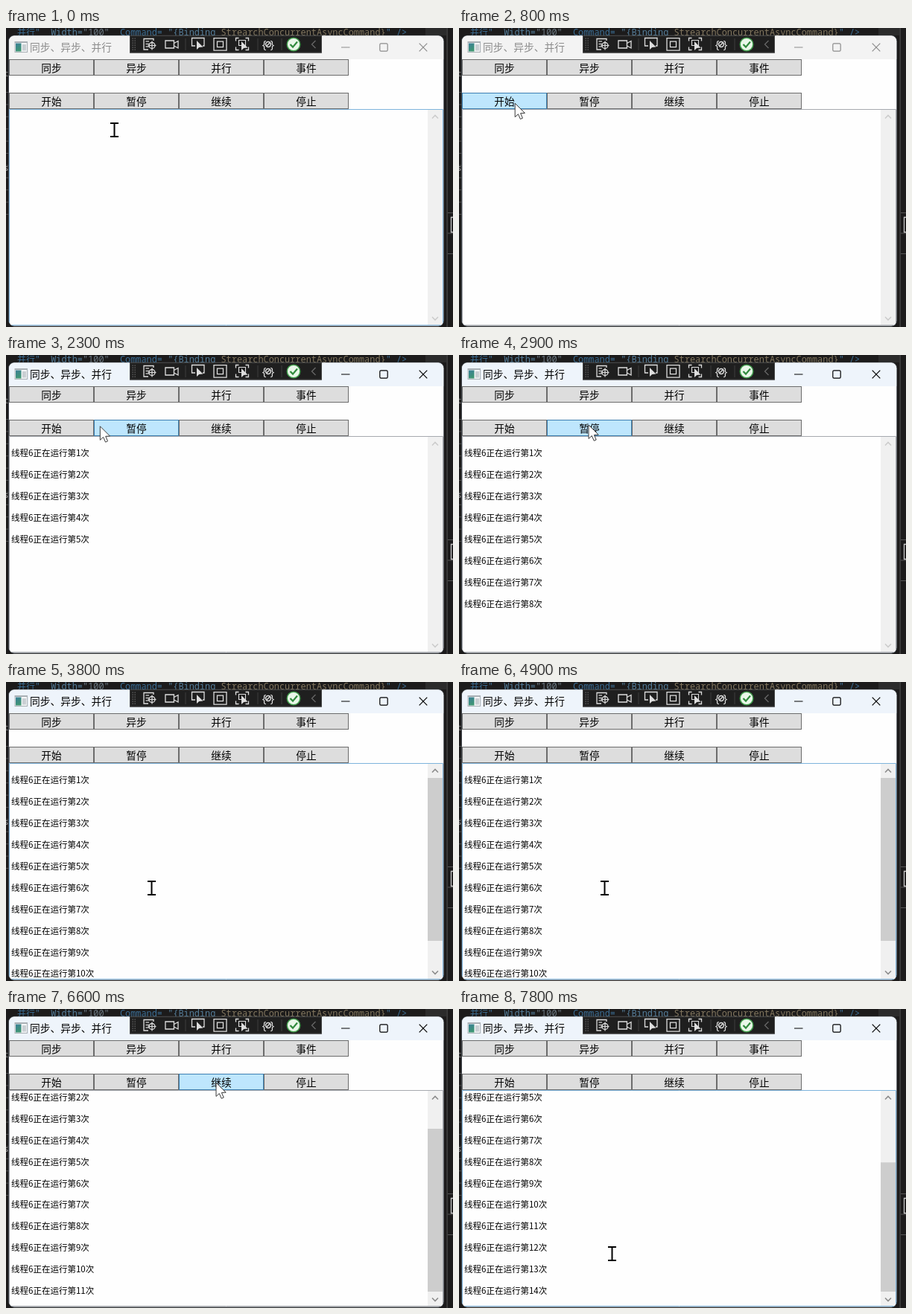
Animation of 600 by 402 pixels, one loop 8000 ms. Source, as an HTML page with a canvas:

```html
<!DOCTYPE html>
<html lang="zh-CN">
<head>
<meta charset="utf-8">
<style>
html, body { margin: 0; width: 100%; height: 100%; overflow: hidden; background: #1c1b1b; }
canvas { display: block; width: 600px; height: 402px; }
</style>
</head>
<body>
<canvas id="stage" width="600" height="402"></canvas>
<script>
const c = document.getElementById('stage').getContext('2d');
const LOOP = 8000, TICK = 200;
const START = 1200, RESUME = 7200;
const CJK = '"Noto Sans CJK SC", "Noto Sans CJK JP", "Noto Sans CJK", sans-serif';
const MONO = '"Noto Sans Mono", "Noto Sans CJK SC", monospace';
const ROWS = ['同步 异步 并行 事件', '开始 暂停 继续 停止'].map(s => s.split(' '));
const BTN = { x: 4, y: 42, w: 114, h: 22, gap: 44.6 };
const VIEW = { x: 4, y: 109, w: 583, h: 291 };
const PITCH = 28.9, PAGE = 290, TRACK = 251;
const INK = '#dedede', BAR = '#1f1f1f';

// Pointer stops: when the move begins, how long it takes, where it ends
const STOPS = [
  { at: 0, dur: 1, x: 145, y: 137 },
  { at: 100, dur: 850, x: 69, y: 98 },
  { at: 1850, dur: 850, x: 174, y: 94 },
  { at: 3350, dur: 450, x: 195, y: 277 },
  { at: 5100, dur: 1400, x: 282, y: 99 },
  { at: 6900, dur: 750, x: 205, y: 329 }
];

const clamp = (v, lo, hi) => Math.min(hi, Math.max(lo, v));
const ticks = (t, from, most) => clamp(Math.floor((t - from) / TICK), 0, most);
const lineCount = t => ticks(t, START, 11) + ticks(t, RESUME, 3);
const scrolled = t => (t >= 4300 && t < 4700) || t >= 5000;

function pointer(t) {
  let { x, y } = STOPS[0];
  for (const s of STOPS) {
    const p = clamp((t - s.at) / s.dur, 0, 1);
    const e = p * p * (3 - 2 * p);
    x += (s.x - x) * e;
    y += (s.y - y) * e;
  }
  return { x, y };
}

function rect(x, y, w, h, fill) {
  c.fillStyle = fill;
  c.fillRect(x, y, w, h);
}

function stroke(color, lw) {
  c.strokeStyle = color;
  c.lineWidth = lw;
  c.stroke();
}

function line(color, lw, ...pts) {
  c.beginPath();
  for (let i = 0; i < pts.length; i += 2) c.lineTo(pts[i], pts[i + 1]);
  stroke(color, lw);
}

// Box given by its centre
function box(cx, cy, w, h, color, lw = 1.3, r = 0) {
  c.beginPath();
  c.roundRect(cx - w / 2, cy - h / 2, w, h, r);
  stroke(color, lw);
}

function ring(x, y, r, fill, color, lw = 1.3) {
  c.beginPath();
  c.arc(x, y, r, 0, Math.PI * 2);
  c.fillStyle = fill;
  c.fill();
  stroke(color, lw);
}

function chevron(x, y, dir, color) {
  line(color, 1.6, x - 4, y + 2 * dir, x, y - 2 * dir, x + 4, y + 2 * dir);
}

// cy is the optical middle of the glyphs
function text(str, x, cy, size, color, align = 'left', font = CJK) {
  c.font = size + 'px ' + font;
  c.textAlign = align;
  c.fillStyle = color;
  c.fillText(str, x, cy + size * 0.38);
}

function drawDesktop() {
  rect(0, 0, 600, 402, '#1c1b1b');
  rect(563, 0, 28, 10, '#2b2b2b');
  const code = '并行"  |Width=|"100"  |Command= |"{Binding |StrearchConcurrentAsyncCommand}|" />';
  const tones = ['#3c6f96', '#557f9c', '#6d7a84'];
  let x = 15;
  code.split('|').forEach((part, i) => {
    text(part, x, 5.2, 11.9, i === 5 ? '#83775f' : tones[i % 3], 'left', MONO);
    x += c.measureText(part).width;
  });
  text('t', -3, 61, 11, '#8a8a8a', 'left', MONO);
  text('s', -3, 188, 11, '#a8a8a8', 'left', MONO);
  for (let y = 86; y < 260; y += 16.4) rect(0, y, 4, 1, '#4c4c4c');
  rect(591.5, 0, 1.2, 402, '#4c4c4c');
  for (let y = 248; y < 310; y += 27.5) rect(593, y, 7, 1, '#555');
  box(602, 264.5, 9, 20, '#c8c8c8');
}

function drawTitle(active) {
  rect(4, 10, 584, 32, active ? '#eef4fb' : '#f3f3f3');
  const ink = active ? '#000' : '#8c8c8c';
  rect(11.5, 18, 17.5, 15, '#a9b0b5');
  rect(12.5, 20, 15.5, 12, '#f4f6f7');
  const g = c.createLinearGradient(13, 20, 20, 32);
  g.addColorStop(0, '#3b7f9a');
  g.addColorStop(1, '#3f9a6b');
  rect(13, 20.5, 7.5, 11, g);
  rect(22, 22, 5, 8.5, '#c9cfd3');
  text('同步、异步、并行', 32, 26, 13.75, ink);
  line(ink, 1.2, 450, 26, 461.5, 26);
  box(507, 26, 10.4, 10.4, ink, 1.2, 1.6);
  for (const s of [-5.3, 5.3]) line(ink, 1.2, 560 - s, 20.7, 560 + s, 31.3);
}

function arrowMark(x, y) {
  c.beginPath();
  for (const [dx, dy] of [[0, 0], [0, 12], [3.2, 9], [8.5, 8.5]]) c.lineTo(x + dx, y + dy);
  c.fillStyle = INK;
  c.fill();
}

function drawTools() {
  rect(166, 10, 258, 23.5, BAR);
  box(295, 21.8, 257, 22.5, '#454545', 1);
  for (let i = 0; i < 12; i++) rect(169.5 + (i % 2) * 3, 13.5 + (i >> 1) * 3, 1.3, 1.3, '#6a6a6a');
  for (const x of [240.5, 337.5, 369.5]) rect(x, 14, 1, 16, '#3f3f3f');

  // page with a target
  line(INK, 1.3, 191, 29, 185, 29, 185, 14.5, 198, 14.5, 198, 17);
  for (let y = 18; y < 26; y += 3.5) line(INK, 1.2, 187.5, y, 192, y);
  ring(196, 23.5, 4, BAR, INK);
  line(INK, 1.2, 196, 17.5, 196, 29.5);
  line(INK, 1.2, 190.5, 23.5, 201.5, 23.5);

  // camera
  box(219.7, 22, 11.5, 10, INK);
  line(INK, 1.3, 225.5, 20.5, 231, 17.5, 231, 27, 225.5, 24);

  // element picker
  line(INK, 1.3, 254, 24, 249.5, 24, 249.5, 13.5, 266, 13.5, 266, 24, 264, 24);
  arrowMark(256, 17);

  // nested boxes
  box(287.5, 21.8, 17, 16.5, INK);
  box(287.5, 21.8, 8, 7.5, INK);

  // tracked selection
  for (const sx of [-1, 1]) for (const sy of [-1, 1]) {
    const x = 317 + 8.5 * sx, y = 21.5 + 8 * sy;
    line(INK, 1.3, x - 4 * sx, y, x, y, x, y - 4 * sy);
  }
  box(317, 20, 9, 7, INK, 1.1);
  arrowMark(316, 18);

  // braces
  text('{', 346.5, 21.5, 15, INK, 'center', MONO);
  text('}', 357.5, 21.5, 15, INK, 'center', MONO);
  ring(352, 22, 3.4, BAR, INK, 1.5);
  line(INK, 1.5, 349.5, 24.5, 354.5, 19.5);

  ring(386, 22, 8.8, '#e9f7e9', '#3f9b4a', 1.5);
  line('#2f8a3c', 2.2, 381.5, 22, 385, 25.6, 391, 18.5);
  line('#676767', 1.3, 415.5, 17, 410.5, 22, 415.5, 27);
}

function drawButtons(p) {
  const { w, h } = BTN;
  ROWS.forEach((labels, r) => labels.forEach((label, i) => {
    const x = BTN.x + i * w, y = Math.round(BTN.y + r * BTN.gap);
    const hot = p.x >= x && p.x < x + w && p.y >= y && p.y < y + h;
    rect(x, y, w, h, hot ? '#3c7fb1' : '#6c6c6c');
    rect(x + 1, y + 1, w - 2, h - 2, hot ? '#bee6fd' : '#dddddd');
    text(label, x + w / 2, y + 11.3, 13.7, '#000', 'center');
  }));
}

function drawLog(t, hover) {
  const n = lineCount(t);
  const max = Math.max(0, (n + 0.5) * PITCH - PAGE);
  const off = scrolled(t) ? max : 0;
  const { x, y, w, h } = VIEW;
  c.save();
  c.beginPath();
  c.rect(x, y + 1, w, h - 2);
  c.clip();
  for (let i = 0; i < n; i++) text(`线程6正在运行第${i + 1}次`, 7, 132 + i * PITCH - off, 11.5, '#000');
  c.restore();

  rect(566, 110, 20, PAGE, '#f0f0f0');
  if (max > 0) {
    const k = TRACK / (PAGE + max);
    rect(566, 129 + off * k, 20, PAGE * k, '#cdcdcd');
  }
  const ink = max > 0 ? '#8c8c8c' : '#cccccc';
  chevron(576, 119.5, 1, ink);
  chevron(576, 390.5, -1, ink);
  box(x + w / 2, y + h / 2, w - 1, h - 1, hover ? '#7eb4dc' : '#a6a9af', 1);
}

function drawBeam({ x, y }) {
  rect(x - 0.5, y - 9, 2, 18, '#000');
  for (const s of [-10, 8]) rect(x - 5, y + s, 11, 2, '#000');
}

function drawArrow({ x, y }) {
  const shape = [[0, 0], [0, 18.5], [4.3, 14.6], [7.2, 21.3], [10.2, 20], [7.4, 13.5], [13.2, 13.2]];
  c.beginPath();
  for (const [dx, dy] of shape) c.lineTo(x + dx, y + dy);
  c.closePath();
  c.fillStyle = '#fff';
  c.fill();
  stroke('#3a3a3a', 1);
}

function draw(t) {
  const p = pointer(t);
  const hover = p.y > VIEW.y && p.x < 566;
  drawDesktop();
  c.save();
  c.beginPath();
  c.roundRect(4, 10.6, 583.2, 390, 7);
  stroke('#4d5359', 1.6);
  c.clip();
  rect(4, 10, 584, 391, '#fefefe');
  drawTitle(t >= START);
  drawButtons(p);
  drawLog(t, hover);
  c.restore();
  drawTools();
  (hover ? drawBeam : drawArrow)(p);
}

function tick() {
  draw(performance.now() % LOOP);
  requestAnimationFrame(tick);
}
tick();
</script>
</body>
</html>
```
